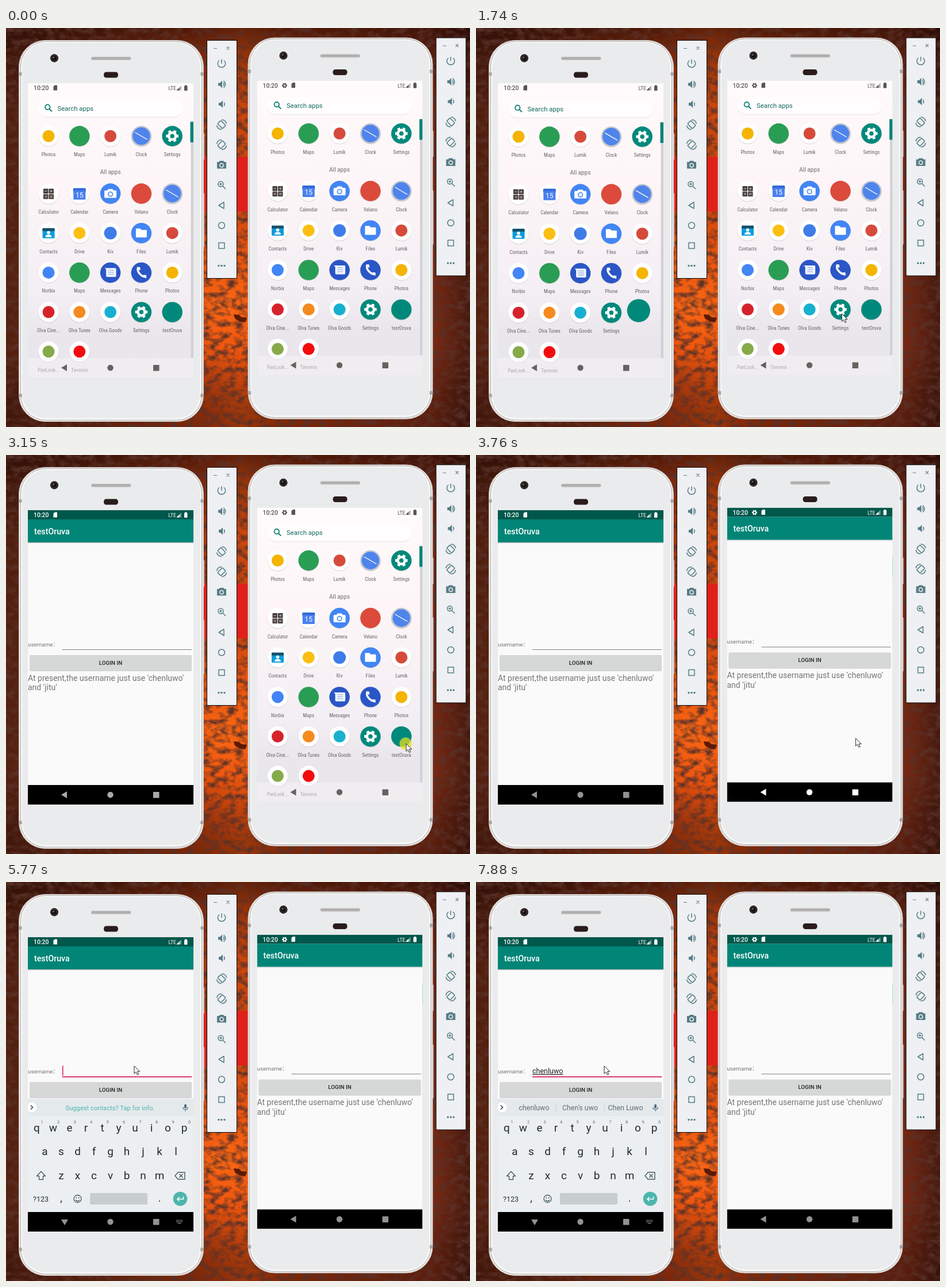
An HTML page that plays this animation: 807x694 px, repeating every 8000 ms.

```html
<!DOCTYPE html>
<html lang="en">
<head>
<meta charset="utf-8">
<title>Two phones</title>
<style>
html, body { margin: 0; width: 100%; height: 100%; overflow: hidden; background: #2a0e08; }
svg { position: absolute; left: 0; top: 0; width: 100vw; height: 100vh; will-change: transform; }
text { font-family: Roboto, "Noto Sans CJK SC", "Noto Sans CJK", sans-serif; white-space: pre; }
.m { text-anchor: middle; }
.b { font-weight: 500; }
.label { text-anchor: middle; font-family: "Roboto Condensed", Roboto, sans-serif; font-stretch: 75%; }
</style>
</head>
<body>
<svg id="wall" viewBox="0 0 807 694" xmlns="http://www.w3.org/2000/svg"></svg>
<svg id="stage" viewBox="0 0 807 694" xmlns="http://www.w3.org/2000/svg"></svg>
<script>
const LOOP = 8000;
const TEAL = '#00897b', BLUE = '#4285f4', NAVY = '#2a56c6', PINK = '#d81b60', TOOL = '#557c84';
const USER = 'chenluwo', APP = 'testOruva';

const clamp = v => Math.max(0, Math.min(1, v));
const lerp = (a, b, k) => a + (b - a) * k;
const $ = id => document.getElementById(id);

// markup helpers
const text = (x, y, s, size, fill, cls = '', extra = '') =>
  `<text x="${x}" y="${y}" font-size="${size}" fill="${fill}" class="${cls}" ${extra}>${s}</text>`;
const rect = (x, y, w, h, fill, r = 0, extra = '') =>
  `<rect x="${x}" y="${y}" width="${w}" height="${h}" rx="${r}" fill="${fill}" ${extra}/>`;
const circle = (x, y, r, fill, extra = '') => `<circle cx="${x}" cy="${y}" r="${r}" fill="${fill}" ${extra}/>`;
const path = (d, fill, extra = '') => `<path d="${d}" fill="${fill}" ${extra}/>`;
const line = (d, color, w = 1, extra = '') => path(d, 'none', `stroke="${color}" stroke-width="${w}" ${extra}`);
const at = (x, y, s, id = '') => `<g ${id && `id="${id}"`} transform="translate(${x} ${y})">${s}</g>`;
const gear = (r, color) =>
  circle(0, 0, r * .56, 'none', `stroke="${color}" stroke-width="${r * .42}"`) +
  circle(0, 0, r * .86, 'none', `stroke="${color}" stroke-width="${r * .28}" pathLength="12" stroke-dasharray="1" stroke-dashoffset=".5"`);

// launcher icons
const disc = (c, s = '') => circle(0, .8, 18, '#000', 'opacity=".13"') + circle(0, 0, 17.7, c) + s;
const plate = s => disc('#fff', s);
const dot = (c, r = 10.5) => plate(circle(0, 0, r, c));
const clock = disc('#c0c6d0', circle(0, 0, 15.2, '#4f84ec') + line('M-11 -6.5L0 0L10.500 6', '#fff', 1.4));
const settings = disc(TEAL, gear(10.8, '#fff'));
const photos = dot('#f4b400'), maps = disc('#2a9d55'), mail = dot('#d64a3c');
const calc = plate([[-9, -8.5], [.5, -8.5], [-9, 1], [.5, 1]].map(([x, y]) => rect(x, y, 8.5, 8.5, '#473f3d', .6)).join('') +
  line('M-7 -4.2h4.5M2.5 -4.2h4.5M4.7 -6.4v4.4M-6.5 3.2l4 4m0 -4l-4 4M2.5 4.2h4.5M2.5 6.4h4.5', '#ddd6d2', .9));
const calendar = plate(rect(-11, -9.5, 22, 7, '#3367d6', 1.5) + rect(-10.5, -5.5, 21, 16, '#4a80ee', 1) + text(0, 6.5, '15', 12, '#fff', 'm'));
const camera = disc(BLUE, path('M-3.5 -8h7l2 2.5h3.5q1.5 0 1.5 1.5v10q0 1.5 -1.5 1.5h-18q-1.5 0 -1.5 -1.5v-10q0 -1.5 1.5 -1.5h3.5z', '#fff') +
  circle(0, 1, 4.6, BLUE) + circle(0, 1, 3, '#fff'));
const contacts = plate(rect(-10.5, -8.5, 21, 17.5, '#0d9ddb', 1.5) + rect(-10.5, -8.5, 21, 5, '#15506c', 1) +
  circle(0, -1, 2.8, '#fff') + path('M-5.5 7q0 -4.5 5.5 -4.5t5.5 4.5z', '#fff'));
const files = disc(BLUE, path('M-8.5 -8h6.500l2.5 2.5h8q1 0 1 1v11q0 1 -1 1h-17q-1 0 -1 -1v-13.5q0 -1 1 -1z', '#fff'));
const messages = disc(NAVY, path('M-10 -8h18q2 0 2 2v11.5q0 2 -2 2h-13.500q-2 0 -2 -2v-11z', '#f1f5ff') +
  line('M-4 -4h10M-4 -.5h10M-4 3h10', '#9db4e8', 1.4));
const phoneIcon = disc(NAVY, line('M-6 -8q-1.5 5 3.5 10.5t10 4.5', '#fff', 3.5) +
  line('M-7.5 -8.5l4 0l.8 4M3.5 5l4 .6l0 4', '#fff', 2.5));

const top5 = [['Photos', photos], ['Maps', maps], ['Lumik', mail], ['Clock', clock], ['Settings', settings]];
const all = [
  ['Calculator', calc], ['Calendar', calendar], ['Camera', camera], ['Velano', disc('#dc4a3b')], ['Clock', clock],
  ['Contacts', contacts], ['Drive', dot('#fbbf12')], ['Kiv', dot('#3f7ce8', 11)], ['Files', files], ['Lumik', mail],
  ['Norbix', dot('#4285f4')], ['Maps', maps], ['Messages', messages], ['Phone', phoneIcon], ['Photos', photos],
  ['Olva Cine...', dot('#d6232b')], ['Olva Tunes', dot('#f58a1f')], ['Olva Goods', dot('#18b0cf')], ['Settings', settings], [APP, disc(TEAL)],
  ['PanLook...', dot('#86a94a')], ['Tavomix', dot('#f20d0d')]
];
const colX = i => 74 + 53.8 * i;

function appIcon([name, art], x, y, id) {
  const s = at(x, y, art) + text(x, y + 35, name, 8.9, '#666467', 'label');
  return id ? `<g id="${id}">${s}</g>` : s;
}

function statusBar(color, withGear) {
  const card = x => path(`M${x - 3} 101.5l2.5 -2h4v9h-6.5z`, color);
  return text(48, 108, '10:20', 10.4, color, 'b') +
    (withGear ? at(86, 104.5, gear(4.6, color)) + card(101) : card(85.5)) +
    text(282.5, 108, 'LTE', 8.6, color) +
    path('M296.5 108.5l8.5 -8.5v8.5z', color, 'opacity=".45"') + path('M296.5 108.5l5 -5v5z', color) +
    rect(310, 100.5, 5.5, 8.5, color, .8) + rect(311.5, 99.3, 2.5, 2, color);
}

const back = path('M96 591l10 -6v12z', 'currentColor');
const homeRecent = circle(181.5, 591, 5.2, 'currentColor') + rect(256, 586, 10.5, 10.5, 'currentColor', .5);

function drawer(id, withGear) {
  const icons = top5.map((a, i) => appIcon(a, colX(i), 188)).join('') +
    all.map((a, i) => appIcon(a, colX(i % 5), 288 + 68.7 * Math.floor(i / 5), a[0] === APP ? id + 'Own' : '')).join('');
  return rect(38, 96, 288, 512, 'url(#paper)') +
    `<g id="${id}Drawer">` +
    rect(56, 126, 251, 30, '#000', 15, 'opacity=".06"') + rect(56, 124.5, 251, 30, '#fffdfd', 15) +
    circle(72.3, 137.6, 4.2, 'none', 'stroke="#00796b" stroke-width="1.7"') + line('M75.5 140.8l4.3 4.3', '#00796b', 1.9) +
    text(89.5, 143.7, 'Search apps', 11.4, '#11695f') +
    text(181.5, 254, 'All apps', 10, '#8a888c', 'm b') + icons +
    rect(321.5, 163, 4.5, 411, '#d3d1d6') + rect(320.5, 163, 5.5, 36, '#0a8476', 1) + '</g>' +
    rect(38, 574, 288, 34, '#f6f4f6', 0, 'opacity=".48"') +
    statusBar('#555', withGear) + `<g color="#67625f">${back}${homeRecent}</g>`;
}

function login(id, withGear) {
  return rect(38, 96, 288, 512, '#fafafa') +
    rect(38, 152, 288, 1, '#c4c8c8') + rect(38, 153, 288, 1.5, '#ebecec') +
    rect(38, 112, 288, 40, '#008577') + rect(38, 96, 288, 16, '#00574b') +
    statusBar('#fff', withGear) + text(49, 137.5, APP, 14.2, '#fff', 'b') +
    text(38, 332.7, 'username：', 9.8, '#757575') +
    rect(98, 338, 225, 1, '#808080', 0, `id="${id}Line"`) +
    rect(41, 349.5, 282, 26.5, '#000', 2, 'opacity=".16"') + rect(41, 348, 282, 26.5, '#d6d7d7', 2) +
    text(182, 364.8, 'LOGIN IN', 9.8, '#222', 'm b') +
    text(38, 392.7, `At present,the username just use '${USER}'`, 14, '#757575') +
    text(38, 409.2, "and 'jitu'", 14, '#757575') +
    (id === 'l' ? text(98, 333, '', 12.5, '#222', '', 'id="typed" text-decoration="underline"') +
      rect(98, 319.5, 1.5, 17.5, PINK, 0, 'id="caret"') +
      `<g clip-path="url(#aboveNav)"><g id="keys">${keyboard()}</g></g>` : '') +
    rect(38, 574, 288, 34, '#000') +
    `<g id="${id}Nav"><g id="${id}Back">${back}</g>${homeRecent}</g>` +
    (id === 'l' ? `<g id="imeNav" color="#929292">${path('M96 587h12l-6 10z', 'currentColor')}` +
      line('M296 588.5h11M296 591h11', 'currentColor', 1.3, 'stroke-dasharray="1.5 .8"') + line('M298.5 593.7h6', 'currentColor', 1.2) + '</g>' : '');
}

function keyboard() {
  const ink = '#1f2b30', row = (s, x, y) => [...s].map((c, i) => text(x + 28.5 * i, y, c, 19, ink, 'm')).join('');
  const icon = d => line(d, '#455a64', 1.4, 'stroke-linejoin="round"');
  return rect(38, 377, 288, 197, '#eceff1') + rect(38, 377, 288, 30, '#e4e9ec') +
    circle(45, 392, 8.5, '#fff') + line('M43 388.5l3.5 3.5l-3.5 3.5', '#37474f', 1.6) +
    rect(310, 386.5, 4, 7.5, '#546e7a', 2) + line('M307.8 391.5q0 4.5 4.2 4.5t4.2 -4.5M312 396v2.5', '#546e7a', 1.2) +
    text(181, 396.5, 'Suggest contacts? Tap for info.', 11.2, '#4db6ac', 'm', 'id="hint"') +
    `<g id="words">${line('M139.5 384v16M223.5 384v16', '#cbd1d4')}` +
    [101, 181, 260].map((x, i) => text(x, 396.5, '', 12.4, '#5f6d73', 'm', `id="word${i}"`)).join('') + '</g>' +
    row('qwertyuiop', 53.5, 434) + row('asdfghjkl', 67.5, 475) + row('zxcvbnm', 96, 516.5) +
    [...'1234567890'].map((c, i) => text(62.5 + 28.5 * i, 420, c, 7.5, '#5c6b72', 'm')).join('') +
    icon('M61 503.5l7.5 8h-4v6h-7v-6h-4z') + icon('M294 511l5 -6h12v12h-12zM301.5 508l6 6m0 -6l-6 6') +
    text(60.5, 555.5, '?123', 12.5, ink, 'm') + text(96, 556, ',', 18, ink, 'm') + text(267, 556, '.', 18, ink, 'm') +
    circle(124.5, 551, 6.5, 'none', 'stroke="#455a64" stroke-width="1.3"') +
    circle(122.3, 549.3, 1, '#455a64') + circle(126.7, 549.3, 1, '#455a64') + icon('M121 553q3.5 4 7 0') +
    rect(146, 541, 100, 20, '#c8cdd0', 2) + circle(303, 551, 12.3, '#4db6ac') +
    line('M308.5 547v4.5h-10.5m3.5 -3.5l-3.5 3.5l3.5 3.5', '#fff', 1.5);
}

function phone(id, dx, dy, withGear) {
  const mark = y => rect(22.5, y, 6, 6, '#a9a5a4') + rect(337.5, y, 6, 6, '#a9a5a4');
  return at(dx, dy,
    rect(341, 183, 4, 46, '#d6d0ce', 1) + rect(341, 287, 4, 94, '#d6d0ce', 1) + rect(248, 19.5, 9, 4, '#4a403e') +
    rect(22.5, 21.5, 321, 663, '#e9e6e5', 46, 'stroke="#cbc5c3"') +
    rect(25.5, 23.5, 315, 658.5, '#f8f8f8', 44, 'stroke="#b3adab"') + mark(77) + mark(636) +
    rect(28, 25.5, 310, 653.5, '#e9ebec', 42, 'stroke="#f7f7f7"') +
    circle(84, 52.5, 8.3, '#f8f8f8') + circle(84, 52.5, 7.2, '#322a2a') + circle(84, 52.5, 3.8, '#151011') + circle(82.8, 51.3, 1.4, '#7d6f70') +
    rect(148, 50, 69.5, 6, '#c0bebe', 3) + rect(149, 51.3, 67.5, 3, '#aeabab', 1.5) + rect(170, 76.5, 25, 10, '#2a1c1d', 4.5) +
    `<clipPath id="${id}Clip"><rect id="${id}Hole"/></clipPath>` +
    `<g clip-path="url(#screen)">${drawer(id, withGear)}` +
    `<g id="${id}App" clip-path="url(#${id}Clip)">${login(id, withGear)}</g>` +
    circle(0, 0, 18, TEAL, `id="${id}Launch"`) + '</g>');
}

function toolbar(dx, dy) {
  const s = d => line(d, TOOL, 1.5, 'stroke-linejoin="round"');
  const ring = (x, y, r, c = TOOL) => circle(x, y, r, 'none', `stroke="${c}" stroke-width="1.5"`);
  const speaker = path('M-6 -2.5h3l4 -4v13l-4 -4h-3z', TOOL);
  const rotate = rect(-4, -6, 8, 12, 'none', 1, `transform="rotate(-45)" stroke="${TOOL}" stroke-width="1.5"`) +
    s('M0 -8.5q7 0 8.5 7M0 8.5q-7 0 -8.5 -7');
  const icons = [
    [62, s('M-4 -5.5a6.7 6.7 0 1 0 8 0M0 -7.5v7.5')],
    [98, speaker + s('M3 -3q2.5 3 0 6M3.5 -6q6.5 6 0 12')],
    [132.5, at(1, 0, speaker + s('M3 -3q2.5 3 0 6'))],
    [168, rotate], [203, `<g transform="scale(-1 1)">${rotate}</g>`],
    [238, path('M-3 -7h6l1.5 2h3.5v11.5h-16v-11.5h3.5z', TOOL) + ring(0, .8, 3.2, '#eef0f3')],
    [273, ring(-1.5, -1.5, 4.5) + s('M2 2l5 5M-3.8 -1.5h4.6M-1.5 -3.8v4.6')],
    [308.5, s('M-5 0l9 -5.5v11z')], [343.5, ring(0, 0, 5.5)], [378.5, s('M-5 -5h10v10h-10z')],
    [413.5, [-5, 0, 5].map(x => circle(x, 0, 1.7, TOOL)).join('')]
  ];
  return at(dx, dy, rect(349.5, 21.5, 52, 414, '#eef0f3', 0, 'stroke="#0b0706"') +
    line('M361 35.5h6M383.5 32.5l5 5m0 -5l-5 5', '#6f7f86', 1.1) + icons.map(([y, a]) => at(375, y, a)).join(''));
}

const stops = list => list.map(([o, c, a = 1]) => `<stop offset="${o}" stop-color="${c}" stop-opacity="${a}"/>`).join('');

// rusty wall: gradients under a fine dark grain
$('wall').innerHTML = `<defs>
<linearGradient id="rust">${stops([[0, '#54200f'], [.2, '#7a2a0e'], [.42, '#b53a0c'], [.51, '#e04e0c'], [.6, '#b0390c'], [.92, '#7c2811'], [1, '#45190f']])}</linearGradient>
<linearGradient id="shade" x2="0" y2="1">${stops([[0, '#180604', .62], [.06, '#180604', .38], [.2, '#180604', .1], [.8, '#180604', 0], [.92, '#180604', .25], [1, '#180604', .35]])}</linearGradient>
<radialGradient id="glow" gradientUnits="userSpaceOnUse" cx="380" cy="480" r="190">${stops([[0, '#ff6a14'], [.5, '#fa5a0e', .7], [1, '#f0500f', 0]])}</radialGradient>
<filter id="grain" x="0" y="0" width="1" height="1">
<feTurbulence type="fractalNoise" baseFrequency=".07 .1" numOctaves="4" seed="5"/>
<feColorMatrix values="0 0 0 0 .1  0 0 0 0 .03  0 0 0 0 .02  2.4 0 0 0 -.95"/>
</filter></defs>` +
  ['rust', 'glow', 'shade'].map(id => rect(0, 0, 807, 694, `url(#${id})`)).join('') +
  rect(0, 0, 807, 694, '#000', 0, 'filter="url(#grain)"') +
  path('M396 498l9 1l5 4l9 1l-3 8l-10 -2l-8 -5z', '#5a1a06') +
  rect(326, 224, 95, 95, '#e0201a');

$('stage').innerHTML = `<defs>
<linearGradient id="paper" x2="0" y2="1">${stops([[0, '#fffafb'], [.35, '#fdf5f7'], [.7, '#f4eff4'], [.85, '#eae7ec'], [1, '#e9e6eb']])}</linearGradient>
<clipPath id="screen"><rect x="38" y="96" width="288" height="512"/></clipPath>
<clipPath id="aboveNav"><rect x="38" y="300" width="288" height="274"/></clipPath>
</defs>` + phone('l', 0, 0, false) + phone('r', 398.5, -4.5, true) + toolbar(0, 0) + toolbar(398.5, -4.5) +
  circle(0, 0, 8, '#e6e020', 'id="ring"') +
  at(0, 0, path('M0 0v13.5l3.2 -3l2.2 4.9l2.3 -1l-2.2 -4.7h4.3z', '#fff', 'stroke="#111" stroke-width=".9" stroke-linejoin="round"'), 'cursor');

// time, x, y of the pointer tip
const track = [
  [280, 478, 690], [420, 390, 616], [560, 300, 530], [670, 266, 506], [820, 274, 506], [1440, 274, 506],
  [1740, 636, 497], [2000, 690, 488], [2290, 705, 478], [2370, 704, 476], [2610, 702, 486], [2760, 696, 502],
  [3600, 696, 502], [3670, 692, 500], [3760, 661, 493], [4440, 225, 322], [4540, 223, 320], [LOOP, 223, 320]
];
const clicks = [860, 3000, 4480];
const keyTimes = [5940, 6000, 6170, 6320, 6550, 6930, 7100, 7330];
const guesses = {
  4: ['chen', 'Chen', 'Chens'], 5: ['chenl', 'Chen l', 'Chenlu'], 6: ['chenlu', 'Chenlu', "Chen's u"],
  7: ['chenluw', 'Chen luw', "Chen's u"], 8: [USER, "Chen's uwo", 'Chen Luwo']
};

const set = (id, attrs) => { for (const k in attrs) $(id).setAttribute(k, attrs[k]); };
const show = (id, on) => set(id, { visibility: on ? 'inherit' : 'hidden' });

function pointer(t) {
  const i = Math.max(1, track.findIndex(k => k[0] > t));
  const [t0, x0, y0] = track[i - 1], [t1, x1, y1] = track[i], k = clamp((t - t0) / (t1 - t0));
  const x = lerp(x0, x1, k), y = lerp(y0, y1, k);
  show('cursor', t >= 280);
  set('cursor', { transform: `translate(${x} ${y})` });
  const start = clicks.find(c => t >= c && t < c + 400);
  show('ring', start !== undefined);
  if (start !== undefined) {
    const p = (t - start) / 400;
    set('ring', { cx: x - 1, cy: y, r: 8 + 7 * p, opacity: .85 * (1 - p * p) });
  }
}

function launch(id, t, start, dim) {
  const p = clamp((t - start) / 400), k = p * p, running = p > 0 && p < 1;
  show(id + 'Own', p === 0);
  set(id + 'Drawer', { transform: `translate(0 ${18 * k})` });
  set(id + 'Hole', {
    x: lerp(271.5, 38, k), y: lerp(476.5, 96, k), width: lerp(35, 288, k), height: lerp(35, 512, k), rx: 17.5 * (1 - k)
  });
  show(id + 'App', k > .06);
  set(id + 'App', { opacity: clamp((k - .06) * 6) });
  show(id + 'Launch', running);
  set(id + 'Launch', { cx: lerp(289, 182, k), cy: lerp(494, 352, k * .3), r: 17.5 + 45 * k, opacity: 1 - clamp((k - .15) * 4) });
  const g = Math.round(lerp(255, 146, clamp((t - dim) / 1150)));
  set(id + 'Nav', { color: `rgb(${g},${g},${g})` });
}

function typing(t) {
  const n = keyTimes.filter(k => t >= k).length, focused = t >= 4770, ime = t >= 4900;
  $('typed').textContent = USER.slice(0, n);
  const since = n ? t - keyTimes[n - 1] - 45 : t - 4770;
  show('caret', focused && (since < 0 || since % 1000 < 500));
  set('caret', { x: 98 + (n ? $('typed').getComputedTextLength() : 0) });
  set('lLine', { fill: focused ? PINK : '#808080', height: focused ? 1.7 : 1 });
  show('lBack', !ime);
  show('imeNav', ime);
  const rise = 1 - clamp((t - 5000) / 290);
  show('keys', rise < 1);
  set('keys', { transform: `translate(0 ${197 * rise * rise})` });
  show('hint', n < 4);
  show('words', n >= 4);
  if (n >= 4) guesses[n].forEach((w, i) => { $('word' + i).textContent = w; });
}

function draw(t) {
  launch('l', t, 1645, 2250);
  launch('r', t, 3180, 3770);
  typing(t);
  pointer(t);
}

const began = performance.now();
function tick() {
  draw((performance.now() - began) % LOOP);
  requestAnimationFrame(tick);
}
tick();
</script>
</body>
</html>
```
